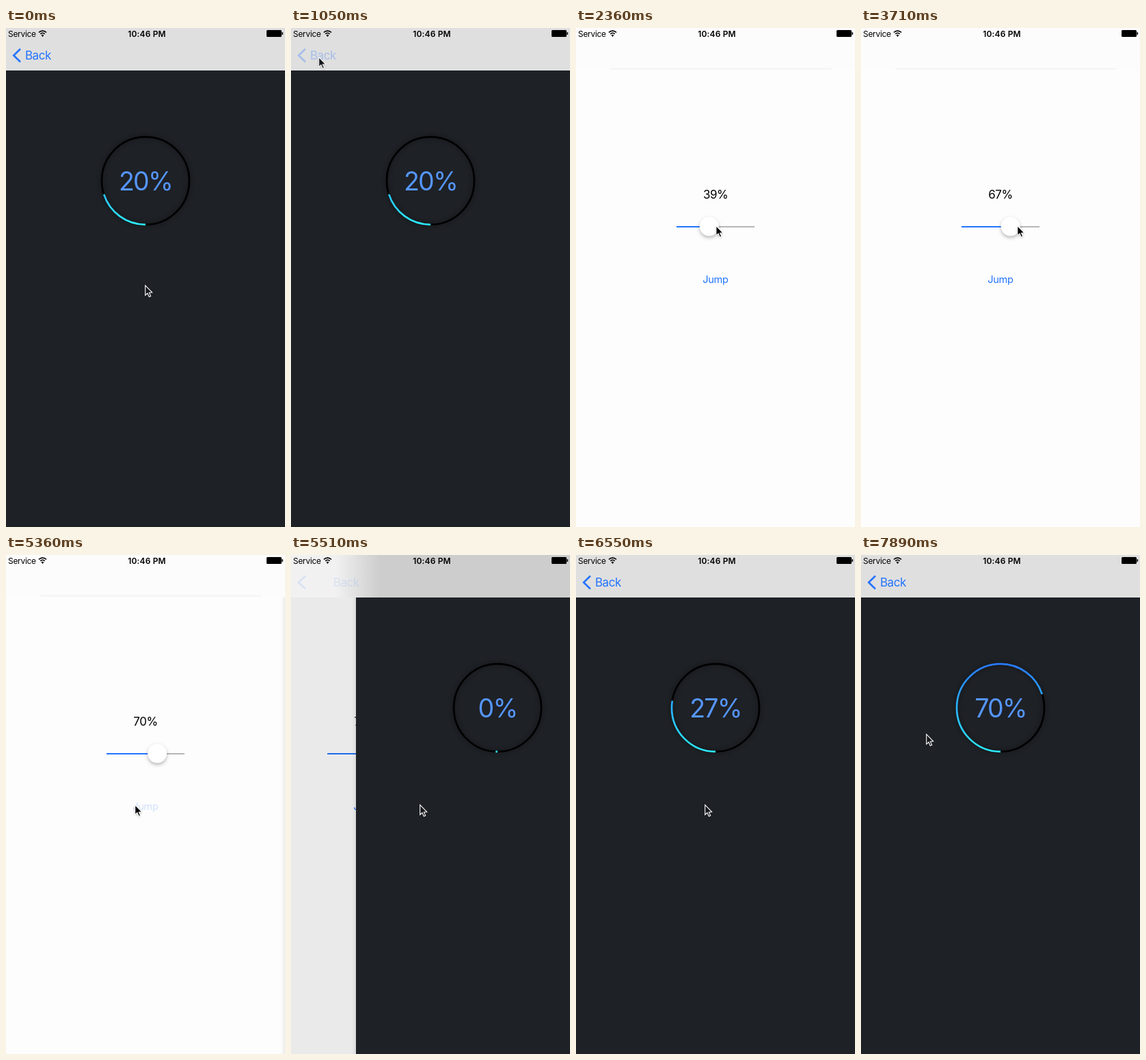
An HTML page with a canvas for the animation above (8000 ms loop, 408 by 728 pixels).

```html
<!DOCTYPE html>
<html lang="en">
<head>
<meta charset="utf-8">
<title>Progress ring</title>
<style>
html, body { margin: 0; width: 408px; height: 728px; overflow: hidden; background: #fdfdfd; }
canvas { display: block; }
</style>
</head>
<body>
<canvas id="stage" width="408" height="728"></canvas>
<script>
const ctx = document.getElementById('stage').getContext('2d');
const W = 408, H = 728, BAR = 62, LOOP = 8000, STEP = 148.4;
const BLUE = '#2474ff', DARK = '#1e2126';
const POP = 1083, PUSH = 5341, GRAB = 1780, DROP = 4160;

const clamp = (v, a = 0, b = 1) => Math.min(b, Math.max(a, v));
const lerp = (a, b, k) => a + (b - a) * k;
const part = (t, a, b) => clamp((t - a) / (b - a));
const easeOut = k => k * (2 - k);

// Critically damped spring, 1 -> 0
function spring(ms) {
  const x = 18.6 * Math.max(0, ms) / 1000;
  return ms > 600 ? 0 : (1 + x) * Math.exp(-x);
}

// 0: ring page covers the stage, 1: slider page is alone
function slide(t) {
  if (t < POP) return 0;
  return t < PUSH ? 1 - spring(t - POP) : spring(t - PUSH);
}

const level = t => 20 + 47 * easeOut(part(t, GRAB, 3710)) + 3 * part(t, 3710, DROP);
const knobX = t => 161 + 0.86 * level(t);

function pointer(t) {
  let p = [203, 375];
  const go = (from, to, x, y) => {
    const k = part(t, from, to);
    p = [lerp(p[0], x, k), lerp(p[1], y, k)];
  };
  go(300, 890, 40, 42);            // to Back
  go(1130, 1330, 167, 273);
  go(1330, 1630, knobX(t) + 9.5, 288); // hold the knob
  go(4310, 4600, 170, 358);
  go(4600, 4900, 188, 364);        // to Jump
  go(7120, 7560, 106, 272);
  go(7720, 7860, 95, 261);
  return p;
}

function text(str, x, y, size, color, align = 'left', weight = 400, gap = 0) {
  ctx.font = `${weight} ${size}px Inter, Roboto, sans-serif`;
  ctx.letterSpacing = gap + 'px';
  ctx.textAlign = align;
  ctx.fillStyle = color;
  ctx.fillText(str, x, y);
}

function line(points, color, width) {
  ctx.beginPath();
  points.forEach(([x, y]) => ctx.lineTo(x, y));
  ctx.strokeStyle = color;
  ctx.lineWidth = width;
  ctx.stroke();
}

function shadow(color, blur, dy) {
  ctx.shadowColor = color;
  ctx.shadowBlur = blur;
  ctx.shadowOffsetY = dy;
}

function sliderPage(t, f) {
  const knob = knobX(t);
  ctx.fillStyle = '#fdfdfd';
  ctx.fillRect(0, 0, W, H);
  ctx.save();
  ctx.translate(-122.4 * (1 - f), 0);
  text(Math.round(level(t)) + '%', 204, 249, 17, '#000', 'center', 400, -0.5);
  line([[147, 290], [knob, 290]], BLUE, 2);
  line([[knob, 290], [261, 290]], '#b6b6b6', 2);
  ctx.save();
  shadow('rgba(0,0,0,.28)', 5, 2.5);
  ctx.fillStyle = '#fff';
  ctx.beginPath();
  ctx.arc(knob, 289.5, 14, 0, 7);
  ctx.fill();
  ctx.restore();
  ctx.globalAlpha = t >= 5190 && t < 5480 ? 0.2 : 1;
  text('Jump', 204, 371.5, 14.6, BLUE, 'center', 400, -0.3);
  ctx.restore();
  ctx.fillStyle = `rgba(0,0,0,${0.095 * (1 - f)})`;
  ctx.fillRect(0, 0, W, H);
}

function ring(cx, cy, p) {
  const r = 64, start = Math.PI / 2;
  ctx.lineWidth = 2.7;
  ctx.save();
  shadow('rgba(0,0,0,.6)', 8, 0);
  ctx.strokeStyle = '#000';
  ctx.beginPath();
  ctx.arc(cx, cy, r, 0, 7);
  ctx.stroke();
  ctx.restore();
  const g = ctx.createLinearGradient(0, cy + r, 0, cy - r);
  g.addColorStop(0, '#2cebff');
  g.addColorStop(1, '#2a7cff');
  ctx.strokeStyle = g;
  ctx.beginPath();
  ctx.arc(cx, cy, r, start, start + Math.PI * 2 * Math.max(p, 0.7) / 100);
  ctx.stroke();
  text(Math.floor(p) + '%', cx, 237, 37.5, '#5596ff', 'center', 380, -1.8);
}

function ringPage(t, f) {
  const x = Math.round(W * f);
  const p = t < PUSH ? 20 : clamp((t - 5862) * 0.0413, 0, 70);
  if (f > 0) {
    const g = ctx.createLinearGradient(x - 6, 0, x, 0);
    g.addColorStop(0, 'rgba(0,0,0,0)');
    g.addColorStop(1, 'rgba(0,0,0,.07)');
    ctx.fillStyle = g;
    ctx.fillRect(x - 6, 0, 6, H);
  }
  ctx.fillStyle = DARK;
  ctx.fillRect(x, 0, W, H);
  ring(x + 204 + 13 * f, 222.9, p);
}

const gray = v => `rgb(${v},${v},${v})`;

function navBar(t, f) {
  const x = W * f;
  const light = gray(lerp(238, 252, f)), dim = gray(223 - 110 * f + 135 * f * f);
  if (f === 0) ctx.fillStyle = dim;
  else if (f > 0.995) ctx.fillStyle = light;
  else {
    const g = ctx.createLinearGradient(x - 30, 0, x + 35, 0);
    g.addColorStop(0, light);
    g.addColorStop(1, dim);
    ctx.fillStyle = g;
  }
  ctx.fillRect(0, 0, W, BAR);
  if (f > 0.9) {
    ctx.fillStyle = '#f6f6f6';
    ctx.fillRect(50, 58, 323, 3);
  }
  const pressed = t >= 890 && t < POP ? 0.3 : 1;
  const fade = Math.pow(1 - f, 8) * pressed;
  ctx.globalAlpha = fade;
  line([[21, 30.5], [11.2, 40], [21, 49.5]], BLUE, 2.6);
  ctx.globalAlpha = Math.max(fade, f > 0 && f < 0.97 ? 0.06 : 0);
  text('Back', 28 + 145 * f, 46, 17, BLUE, 'left', 400, -0.5);
  ctx.globalAlpha = 1;
}

function statusBar() {
  text('Service', 3, 13, 12, '#000', 'left', 400, -0.3);
  ctx.strokeStyle = ctx.fillStyle = '#000';
  ctx.lineWidth = 1.7;
  for (const r of [4.6, 7.8]) {
    ctx.beginPath();
    ctx.arc(53.5, 12, r, -Math.PI * 0.75, -Math.PI * 0.25);
    ctx.stroke();
  }
  ctx.beginPath();
  ctx.moveTo(53.5, 13);
  ctx.arc(53.5, 12, 2.4, -Math.PI * 0.78, -Math.PI * 0.22);
  ctx.fill();
  text('10:46 PM', 206, 13, 12, '#000', 'center', 600, 0.15);
  ctx.beginPath();
  ctx.roundRect(381, 3, 22, 10, 1.5);
  ctx.roundRect(403.5, 6, 1.6, 4, 0.8);
  ctx.fill();
}

function arrow(t, f) {
  const [x, y] = pointer(t);
  ctx.save();
  ctx.translate(x + 0.7, y + 0.7);
  shadow('rgba(0,0,0,.35)', 3, 1);
  ctx.beginPath();
  [[0, 0], [0, 14.2], [3.2, 11.3], [5.6, 16.6], [8, 15.6], [5.7, 10.5], [10, 10.2]]
    .forEach(([px, py]) => ctx.lineTo(px, py));
  ctx.closePath();
  ctx.fillStyle = x < W * f ? '#000' : '#17191c';
  ctx.fill();
  ctx.shadowColor = 'transparent';
  ctx.strokeStyle = '#fff';
  ctx.lineWidth = 1.1;
  ctx.stroke();
  ctx.restore();
}

function draw(ms) {
  const t = Math.floor(ms / STEP) * STEP; // the picture moves in even steps
  const f = slide(t);
  if (f > 0) sliderPage(t, f);
  if (f < 1) ringPage(t, f);
  navBar(t, f);
  statusBar();
  arrow(t, f);
}

const begin = performance.now();
function tick() {
  draw((performance.now() - begin) % LOOP);
  requestAnimationFrame(tick);
}
tick();
</script>
</body>
</html>
```
